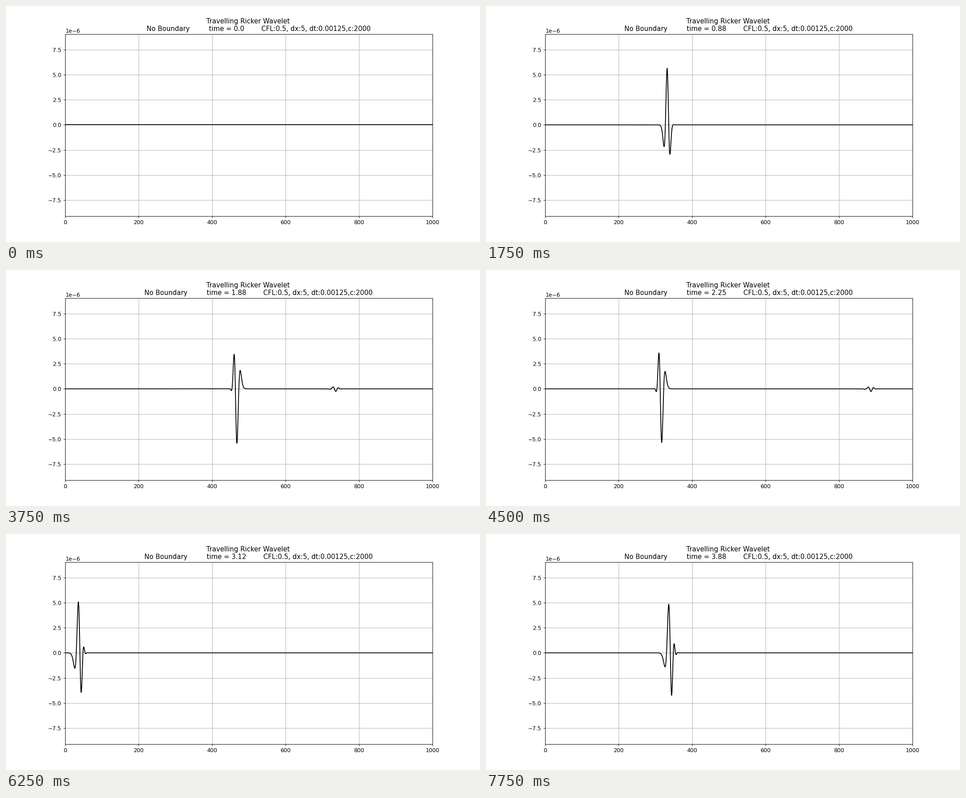
These frames come from a looping animation (1058 px wide and 529 px high, 8000 ms). A matplotlib script:

```python
import numpy as np
import matplotlib.pyplot as plt
from matplotlib.animation import FuncAnimation

DX, DT, SPEED = 5, 0.00125, 2000
CFL = SPEED * DT / DX
FRAMES, STEPS_PER_FRAME, INTERVAL = 32, 100, 250
GRID, VISIBLE = 1700, 1001      # spare cells let the wave leave on the right
SOURCE, WALL = 2, 600
PEAK_FREQ = 20


def ricker(t):
    a = (np.pi * PEAK_FREQ * (t - 1 / PEAK_FREQ)) ** 2
    return (1 - 2 * a) * np.exp(-a)


def simulate():
    """Wave equation, fourth order in space, second order in time."""
    snapshots = []
    old, u = np.zeros(GRID), np.zeros(GRID)
    for step in range(FRAMES * STEPS_PER_FRAME):
        if step % STEPS_PER_FRAME == 0:
            snapshots.append(u[:VISIBLE].copy())
        new = np.zeros(GRID)
        curvature = (-u[:-4] + 16 * u[1:-3] - 30 * u[2:-2] + 16 * u[3:-1] - u[4:]) / 12
        new[2:-2] = 2 * u[2:-2] - old[2:-2] + CFL ** 2 * curvature
        new[SOURCE] += DT ** 2 * ricker(step * DT)
        new[WALL] = 0
        old, u = u, new
    return snapshots


def caption(frame):
    time = round(frame * STEPS_PER_FRAME * DT, 2)
    return (" " * 9 + "No Boundary" + " " * 9 + f"time = {time}" + " " * 8
            + f"CFL:{CFL}, dx:{DX}, dt:{DT},c:{SPEED}")


plt.rcParams["font.family"] = "DejaVu Sans"
snapshots = simulate()

fig, ax = plt.subplots(figsize=(12, 6), dpi=529 / 6)    # 1058 x 529 pixels
line, = ax.plot(np.arange(VISIBLE), snapshots[0], color="black", lw=1.5)
ax.set_xlim(0, 1000)
ax.set_ylim(-9.09e-6, 9.0235e-6)
ax.grid(True)
ax.annotate("Travelling Ricker Wavelet\n ", (0.5, 1), xycoords="axes fraction",
            xytext=(-1.8, 6), textcoords="offset points", ha="center", fontsize=12)
title = ax.set_title(caption(0), fontsize=12)


def update(frame):
    line.set_ydata(snapshots[frame])
    title.set_text(caption(frame))
    return line, title


anim = FuncAnimation(fig, update, frames=FRAMES, interval=INTERVAL, repeat=True)
plt.show()
```
